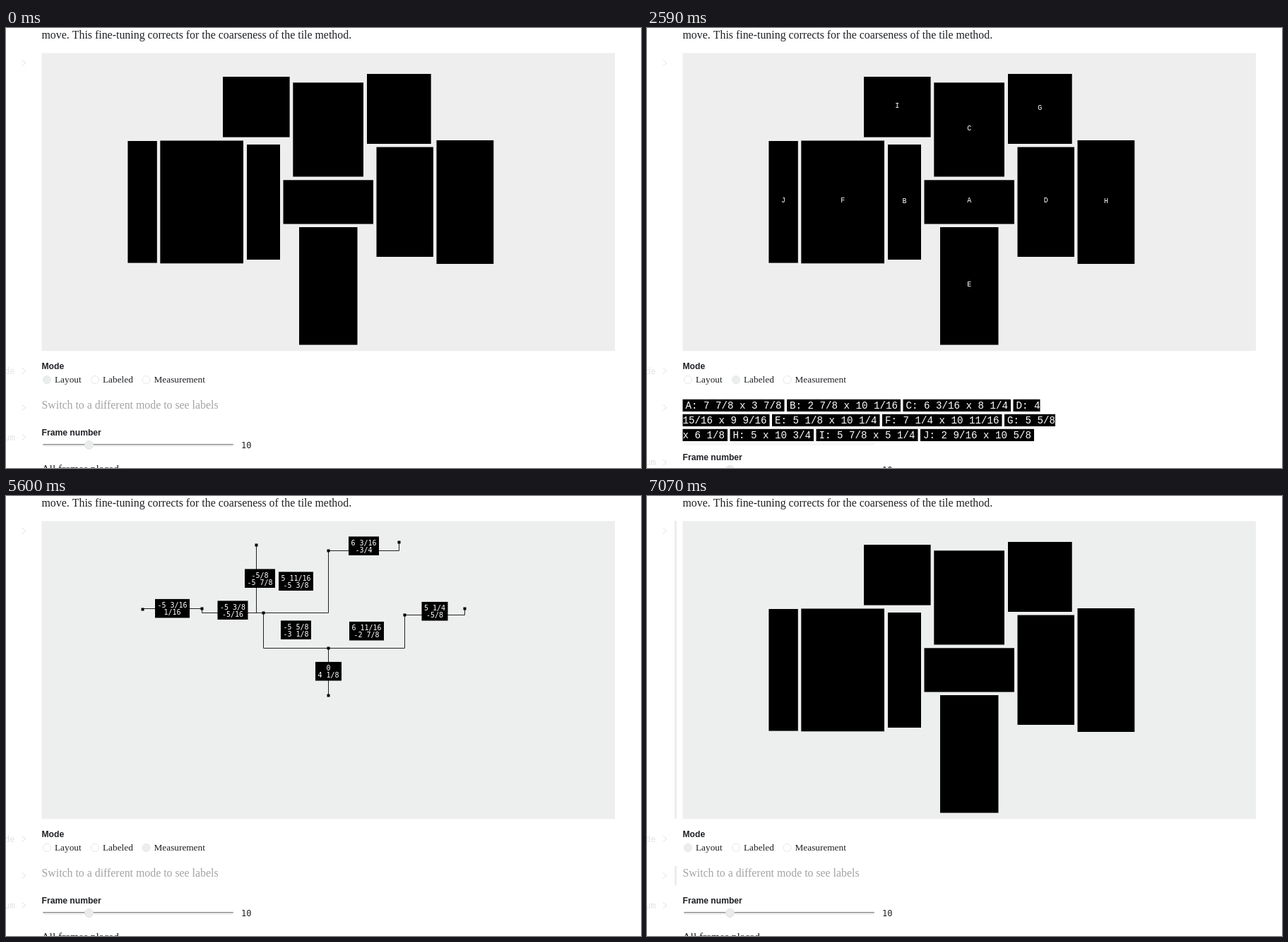
An HTML page with a canvas that plays this animation: 899 px wide and 623 px high, repeating every 7140 ms.

```html
<!DOCTYPE html>
<html lang="en">
<head>
<meta charset="utf-8">
<title>Frame layout modes</title>
<style>
  html, body { margin: 0; width: 100%; height: 100%; overflow: hidden; background: #fff; }
  canvas { display: block; }
</style>
</head>
<body>
<canvas id="stage" width="899" height="623"></canvas>
<script>
const ctx = document.getElementById('stage').getContext('2d');
const LOOP = 7140, STEP = 70;
const INK = '#1e2024';
const SERIF = '"Liberation Serif", serif';
const BOLD = 'bold 12.15px "Liberation Sans", sans-serif';
const MONO = '"Liberation Mono", monospace';
const MENLO = '"DejaVu Sans Mono", monospace';

// Picture frames: left, top, right, bottom
const frames = {
  A: [392.5, 215.3, 520, 277.5],
  B: [341, 165, 388, 328],
  C: [406.3, 77.3, 506, 210.5],
  D: [524.5, 168.6, 605, 324],
  E: [415, 282, 497.5, 448.6],
  F: [218.3, 159.5, 336, 333.3],
  G: [511, 65, 601.7, 164],
  H: [609.5, 159, 690.3, 334],
  I: [307, 69, 401.6, 154.6],
  J: [172.4, 160, 213.8, 332.6]
};

// Parent and child frame, horizontal and vertical offset
const links = [
  ['A', 'B', '-5 5/8', '-3 1/8'], ['A', 'D', '6 11/16', '-2 7/8'],
  ['A', 'E', '0', '4 1/8'], ['B', 'C', '5 11/16', '-5 3/8'],
  ['B', 'F', '-5 3/8', '-5/16'], ['B', 'I', '-5/8', '-5 7/8'],
  ['C', 'G', '6 3/16', '-3/4'], ['D', 'H', '5 1/4', '-5/8'],
  ['F', 'J', '-5 3/16', '1/16']
];

// Wrapped size labels; "<" continues a box from the line above, ">" onto the next
const sizeRows = [
  ['A: 7 7/8 x 3 7/8', 'B: 2 7/8 x 10 1/16', 'C: 6 3/16 x 8 1/4', 'D: 4>'],
  ['<15/16 x 9 9/16', 'E: 5 1/8 x 10 1/4', 'F: 7 1/4 x 10 11/16', 'G: 5 5/8>'],
  ['<x 6 1/8', 'H: 5 x 10 3/4', 'I: 5 7/8 x 5 1/4', 'J: 2 9/16 x 10 5/8']
];

const radios = [['Layout', 58], ['Labeled', 126], ['Measurement', 198.5]];
const LAYOUT = 0, LABELED = 1, MEASURE = 2;
const switches = [[-LOOP, LAYOUT], [1330, LABELED], [2730, MEASURE], [5670, LABELED], [7000, LAYOUT]];

function rect(x, y, w, h, color) {
  ctx.fillStyle = color;
  ctx.fillRect(x, y, w, h);
}

function text(str, x, y, font, color = INK, align = 'left') {
  ctx.font = font;
  ctx.fillStyle = color;
  ctx.textAlign = align;
  ctx.fillText(str, x, y);
}

function circle(x, y, r, fill, stroke) {
  ctx.beginPath();
  ctx.arc(x, y, r, 0, 2 * Math.PI);
  ctx.fillStyle = fill;
  ctx.fill();
  if (!stroke) return;
  ctx.strokeStyle = stroke;
  ctx.lineWidth = 1;
  ctx.stroke();
}

function line(points, color, width = 1) {
  ctx.beginPath();
  points.forEach(p => ctx.lineTo(...p));
  ctx.strokeStyle = color;
  ctx.lineWidth = width;
  ctx.stroke();
}

function drawFrames(labeled) {
  for (const [id, [l, t, r, b]] of Object.entries(frames)) {
    rect(l, t, r - l, b - t, '#000');
    if (labeled) text(id, (l + r) / 2, (t + b) / 2 + 1, '10px ' + MONO, '#fff', 'center');
  }
}

function drawMeasurements() {
  const anchor = id => [Math.floor((frames[id][0] + frames[id][2]) / 2) + 0.5, Math.floor(frames[id][1]) + 0.5];
  for (const [from, to] of links) {
    const [x1, y1] = anchor(from), [x2, y2] = anchor(to);
    line([[x1, y1], [x2, y1], [x2, y2]], '#222');
  }
  for (const id in frames) {
    const [x, y] = anchor(id);
    rect(x - 2, y - 2, 4, 4, '#000');
  }
  for (const [from, to, dx, dy] of links) {
    const a = anchor(from), b = anchor(to);
    const x = (a[0] + b[0]) / 2, y = (a[1] + b[1]) / 2 - 0.8;
    const w = Math.max(dx.length, dy.length) * 6 + 7;
    rect(x - w / 2, y - 13.3, w, 26.6, '#000');
    text(dx, x, y - 1, '10px ' + MENLO, '#fff', 'center');
    text(dy, x, y + 9.2, '10px ' + MENLO, '#fff', 'center');
  }
}

function drawSizes() {
  const char = 8.5, pad = 4;
  sizeRows.forEach((row, i) => {
    let x = 50.5;
    for (const item of row) {
      const label = item.replace(/[<>]/g, '');
      const left = item[0] === '<' ? 0 : pad, right = item.endsWith('>') ? 0 : pad;
      const w = label.length * char + left + right;
      rect(x, 525.8 + i * 21, w, 17.2, '#000');
      text(label, x + left, 539 + i * 21, '14.17px ' + MONO, '#fff');
      x += w + 3.5;
    }
  });
}

function drawGutter(numberY, color) {
  for (const y of [49.5, 485.5, 537.5, numberY])
    line([[22.5, y - 4], [28, y], [22.5, y + 4]], color);
  text('de', 12.5, 489.5, '12px ' + MENLO, color, 'right');
  text('um', 12.5, numberY + 4, '12px ' + MENLO, color, 'right');
}

function drawRadios(mode, vivid) {
  radios.forEach(([label, x], i) => {
    const on = i === mode;
    if (on && vivid) {
      circle(x, 498, 6, '#4a90e2');
      circle(x, 498, 2, '#fff');
    } else {
      circle(x, 498, 5.5, on ? '#eaeeed' : '#fff', vivid ? '#b8b8b8' : '#e6e8e7');
    }
    text(label, x + 11, 502, '13.3px ' + SERIF);
  });
}

function drawSlider(shift, vivid) {
  text('Frame number', 50.5, 577 + shift, BOLD);
  rect(52.5, 589, 269, 1.2, '#808080');
  if (shift) rect(52, 588, 270, 3, '#f7f7f7');
  rect(52.5, 589 + shift, 269, 1.2, '#808080');
  rect(52.5, 590.2 + shift, 269, 2, '#e4e4e4');
  circle(117.5, 590.5 + shift, 6, vivid ? '#fff' : '#eaeceb', vivid ? '#aaa' : '#e2e4e3');
  text('10', 333, 594.5 + shift, '12px ' + MENLO);
}

function draw(t) {
  const at = switches.findLastIndex(([start]) => t >= start);
  const [start, mode] = switches[at];
  const age = t - start;
  const labeled = mode === LABELED;
  const vivid = labeled && age < 5 * STEP;
  const shift = labeled ? 35 : 0;
  // The gutter label follows one step after the cell has resized
  const gutterMode = age < STEP && at ? switches[at - 1][1] : mode;

  rect(0, 0, 899, 623, vivid ? '#f7f7f7' : '#fff');
  if (!vivid) rect(50.5, 35.5, 811.5, 421.8, mode === MEASURE || t >= 7000 ? '#edefee' : '#eee');
  text('move. This fine-tuning corrects for the coarseness of the tile method.', 50.5, 15.3, '15.9px ' + SERIF);

  if (mode === MEASURE) drawMeasurements();
  else drawFrames(labeled);

  drawGutter(gutterMode === LABELED ? 615 : 579.5, vivid ? '#b4b4b4' : '#e2e3e3');
  if (age >= STEP && age < 7 * STEP) {
    const color = vivid ? '#aeaeb5' : '#ebeceb';
    rect(39, 35.5, 3, 421.5, color);
    rect(39, 524, 3, labeled ? 62 : 27.5, color);
  }

  text('Mode', 50.5, 482.5, BOLD);
  drawRadios(mode, vivid);
  if (labeled) {
    drawSizes();
  } else {
    text('Switch to a different mode to see labels', 50.5, 539, '15.85px ' + SERIF, '#a4a4a4');
    text('All frames placed', 50.5, 629, '15.4px ' + SERIF);
  }
  drawSlider(shift, vivid);
}

function tick() {
  draw(performance.now() % LOOP);
  requestAnimationFrame(tick);
}
tick();
</script>
</body>
</html>
```
